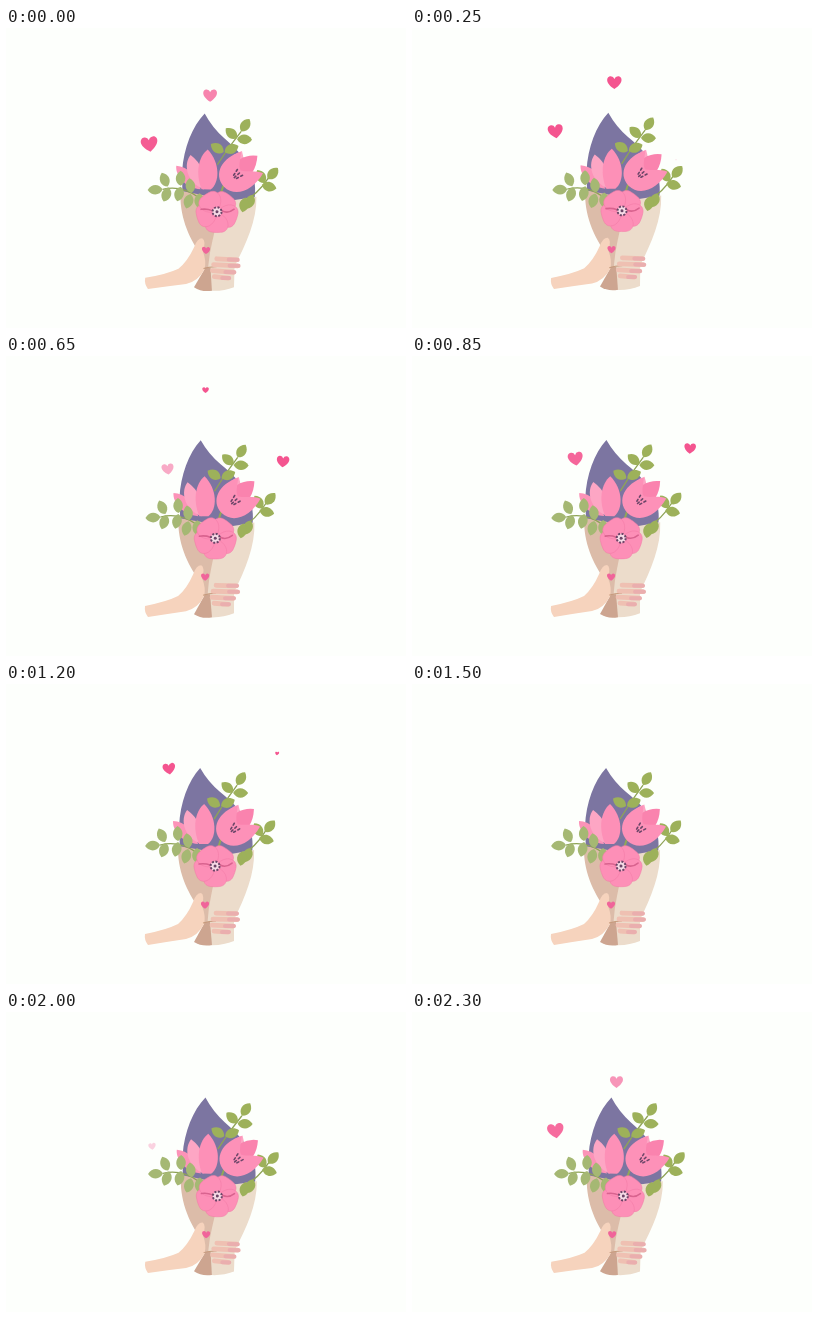
These frames come from a looping animation (400 px wide and 300 px high, 2.35 s). An HTML page:

```html
<!DOCTYPE html>
<html lang="en">
<head>
<meta charset="utf-8">
<title>Bouquet</title>
<style>
  html, body { margin: 0; height: 100%; overflow: hidden; background: #fdfffc; }
  svg { display: block; width: 100%; height: 100%; }
</style>
</head>
<body>
<svg viewBox="0 0 400 300">
  <defs>
    <path id="leaf" d="M0 0C3 -6.500 11 -6.500 15 0C11 6 4 6.500 0 0Z"/>
    <path id="heart" d="M0 7C-11 0 -8.500 -7 -4 -7Q-1 -7 0 -4Q1 -7 4 -7C8.500 -7 11 0 0 7Z"/>
    <path id="petal" d="M0 0C-15 -6 -14 -20 -4 -20.500Q0 -21 4 -20.500C14 -20 15 -6 0 0Z"/>
  </defs>

  <g id="bouquet">
    <path fill="#7c75a1" d="M194 84C182 97 174 119 173 142L174 170L246 170C249 146 241 130 214 108Q202 98 194 84Z"/>
    <path fill="#dcbca9" d="M172 162C171 186 181 208 193 224L198 240L206 258L215 200L232 172Z"/>
    <path fill="#ecdccb" d="M248 166C249 190 239 213 228 236L228 257Q216 262 202 261Q200 235 205 212L213 172Z"/>
    <path fill="#cda590" d="M199 238L188 258Q196 263 206 261L204 238Z"/>
    <g id="backLeaves" fill="#9db15a"></g>
    <path fill="none" stroke="#91a857" stroke-width="2" d="M216 153Q212 161 211 172"/>

    <path fill="#fc93b8" d="M192 160C176 159 166 146 167 137Q184 138 192 160Z"/>
    <path fill="#fda6c4" d="M195 160C177 153 174 135 181 126Q198 138 195 160Z"/>
    <path fill="#fd90b7" d="M193 160C186 144 189 127 198 120C211 133 211 153 202 160Z"/>

    <g transform="translate(230 141.500) rotate(47) scale(1.060)">
      <path fill="#fda6c4" d="M-13 -15Q-3 -11 0 0L-8 12Q-19 -1 -13 -15Z"/>
      <path fill="#fa83ae" d="M0 -23Q13 -10 8 6L-8 6Q-12 -13 0 -23Z"/>
      <path fill="#fd91b8" d="M-13 -14C-8 -9 -5 -3 0 -2C5 -5 9 -13 16 -16C22 2 16 19 1 20C-15 20 -21 3 -13 -14Z"/>
      <path fill="none" stroke="#6b4568" stroke-width="1.500" stroke-linecap="round" stroke-dasharray="2 2.500" d="M1 7V-1M3 6L5 -2M-1 6L-3 -1"/>
    </g>

    <g id="frontLeaves" fill="#a5b873"></g>

    <g transform="translate(209 182)">
      <g id="petals" fill="#fd8fb7"></g>
      <path fill="none" stroke="#d9638f" stroke-width="1.600" stroke-linecap="round" d="M5 -1Q11 2 17 -3M-5 -1Q-10 -3 -16 -2"/>
      <circle r="4.500" fill="#f6dbe6" stroke="#6b4568" stroke-width="2" stroke-dasharray="2 1.500"/>
      <circle r="1.500" fill="#6b4568"/>
    </g>

    <path fill="#f6d3bd" d="M139 250Q160 246 172 240Q181 232 187 218Q190 209 195 209Q199 211 196 222Q200 232 198 240Q192 252 180 255Q160 258 142 261Q138 256 139 250Z"/>
    <use href="#heart" fill="#f0649a" transform="translate(199 221) scale(.52)"/>
    <path fill="none" stroke="#c69a7c" d="M197 239Q203 237 210 237"/>
    <g fill="none" stroke="#efc0b2" stroke-width="4.800" stroke-linecap="round">
      <path d="M210 229L230 229.500M207 235L231 235.500M206 241L227 242M208 247L222 248"/>
      <path stroke="#eaaeae" stroke-width="4" d="M222 229.500H231M223 235.500H232M219 242H228M216 248H223"/>
    </g>
  </g>
  <g id="hearts" fill="#f4558f"></g>
</svg>

<script>
const LOOP = 2350, ENTER = 1700;
const byId = id => document.getElementById(id);

function add(parent, tag, attrs) {
  const el = document.createElementNS('http://www.w3.org/2000/svg', tag);
  for (const name in attrs) el.setAttribute(name, attrs[name]);
  return parent.appendChild(el);
}

// Each leaf: base x, base y, angle
function branch(parent, stem, leaves) {
  add(parent, 'path', { d: stem, fill: 'none', stroke: '#8ea356', 'stroke-width': 1.3 });
  for (const [x, y, angle] of leaves)
    add(parent, 'use', { href: '#leaf', transform: `translate(${x} ${y}) rotate(${angle})` });
}

branch(byId('backLeaves'), 'M208 135Q218 118 231 101', [
  [231, 101, -58], [227, 108, -140], [227, 109, 0], [214, 122, -150], [215, 122, -25]]);
branch(byId('backLeaves'), 'M232 174Q250 163 260 146', [
  [259, 148, -50], [256, 152, -122], [253, 154, 12], [244, 164, 110], [237, 167, 100]]);
branch(byId('frontLeaves'), 'M190 168Q172 156 154 161', [
  [154, 161, 176], [159, 158, -115], [160, 159, 108], [172, 157, -92], [172, 158, 102],
  [183, 164, -100], [182, 165, 105], [191, 164, 92]]);

for (let i = 0; i < 5; i++)
  add(byId('petals'), 'use', { href: '#petal', transform: `rotate(${i * 72 + 36})`,
    stroke: '#f27ba6', 'stroke-width': .5 });

const hearts = [
  { born: 1970, x: 146.5, y: 136, drift: 0, bow: -3.2, rise: 51, width: 16, tilt: -8 },
  { born: 2090, x: 206, y: 81, drift: -7, bow: 0, rise: 51, width: 14, tilt: 0 },
  { born: 250, x: 264, y: 132, drift: 6, bow: 11, rise: 65, width: 12, tilt: 4 },
  { born: 500, x: 160, y: 121, drift: 0, bow: 4, rise: 51, width: 14.5, tilt: -8 }
].map(h => ({ ...h, el: add(byId('hearts'), 'use', { href: '#heart' }) }));
const LIFE = 990;

const since = (t, start) => (t - start + LOOP) % LOOP;

function drawBouquet(age) {
  const left = (1 - Math.min(1, age / 300)) ** 2;
  const sway = 1.8 * Math.exp(-Math.max(0, age - 600) / 350);
  byId('bouquet').setAttribute('transform',
    `translate(${-185 * left} ${-22 * left}) rotate(${sway - 111 * left} 145 258)`);
}

function drawHeart(h, age) {
  const p = Math.min(1, age / LIFE);
  const scale = h.width / 15 * Math.sqrt(Math.max(0, Math.sin(Math.PI * p ** .8)));
  const x = h.x + h.drift * p + h.bow * Math.sin(Math.PI * p);
  h.el.setAttribute('transform',
    `translate(${x} ${h.y - h.rise * p}) rotate(${h.tilt}) scale(${scale})`);
  h.el.setAttribute('opacity', Math.min(1, .2 + age / 500));
}

const start = performance.now();
function frame() {
  const t = (performance.now() - start) % LOOP;
  drawBouquet(since(t, ENTER));
  for (const h of hearts) drawHeart(h, since(t, h.born));
  requestAnimationFrame(frame);
}
frame();
</script>
</body>
</html>
```
